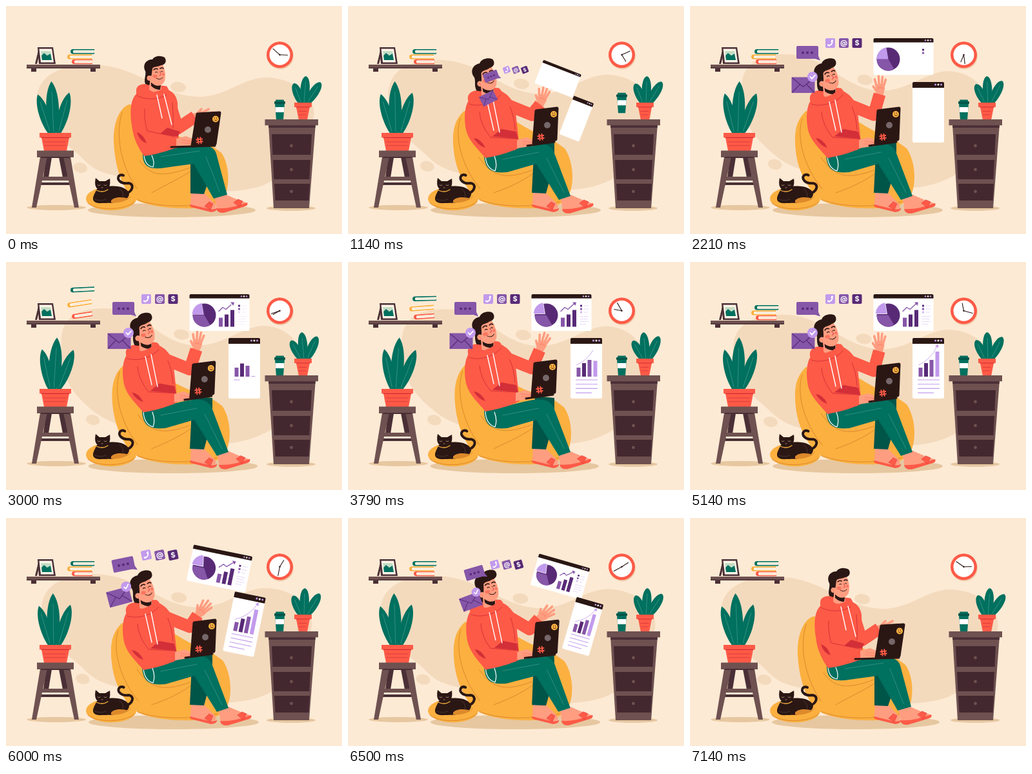
Write an HTML page that moves like this. It is 521x354 px and loops after 7210 ms.

```html
<!DOCTYPE html>
<html lang="en">
<head>
<meta charset="utf-8">
<title>Working from home</title>
<style>
  html, body { margin: 0; width: 100%; height: 100%; overflow: hidden; background: #fdead4; }
  svg { display: block; width: 100vw; height: 100vh; }
  text { font-family: Inter, Arial, sans-serif; font-weight: 700; text-anchor: middle; }
</style>
</head>
<body>
<svg id="stage" viewBox="0 0 521 354"></svg>
<script>
const LOOP = 7210;
const C = {
  blob: '#f4dabd', shadow: '#e6c7a0', coral: '#fd5a47', red: '#d22f38', bag: '#fbb040', crease: '#dd8a2c',
  teal: '#00705f', deep: '#005549', mint: '#52a392', ink: '#2a1714', wood: '#6e5150', dark: '#4a2f36',
  drawer: '#43282f', skin: '#ff9d80', blush: '#f9735e', lilac: '#c29aec', purple: '#8656a8', violet: '#582a76', white: '#fff'
};

// Timing helpers
const mix = (a, b, k) => a + (b - a) * k;
const span = (t, a, b) => Math.min(1, Math.max(0, (t - a) / (b - a)));
const smooth = (t, a, b) => { const u = span(t, a, b); return u * u * (3 - 2 * u); };
const hop = (t, peak, half) => Math.max(0, 1 - ((t - peak) / half) ** 2);
const wave = u => (1 - Math.cos(2 * Math.PI * u)) / 2;
const track = (t, keys) => {
  let i = 1;
  while (i < keys.length - 1 && t > keys[i][0]) i++;
  const [a, ...from] = keys[i - 1], [b, ...to] = keys[i], k = smooth(t, a, b);
  return from.map((v, j) => mix(v, to[j], k));
};
const morph = (a, b, k) => {
  const goal = b.match(/-?[\d.]+/g);
  let i = 0;
  return a.replace(/-?[\d.]+/g, v => mix(+v, +goal[i++], k).toFixed(2));
};

// Drawing helpers
const fill = (d, color, more = '') => `<path d="${d}" fill="${color}" ${more}/>`;
const line = (d, color, w = 1, more = '') =>
  `<path d="${d}" fill="none" stroke="${color}" stroke-width="${w}" stroke-linecap="round" stroke-linejoin="round" ${more}/>`;
const rect = (x, y, w, h, color, r = 0) => `<rect x="${x}" y="${y}" width="${w}" height="${h}" rx="${r}" fill="${color}"/>`;
const oval = (x, y, rx, ry, color, more = '') => `<ellipse cx="${x}" cy="${y}" rx="${rx}" ry="${ry}" fill="${color}" ${more}/>`;
const dot = (x, y, r, color) => oval(x, y, r, r, color);
const group = (transform, ...parts) => `<g transform="${transform}">${parts.join('')}</g>`;
const drawn = (d, color, w, k) => k > 0 ? line(d, color, w, `pathLength="1" stroke-dasharray="${k} 2"`) : '';

function blob(k) {
  return fill(morph(
    'M48,142 C50,112 78,92 128,91 C205,89 236,141 302,141 C346,138 366,112 402,111 C450,111 486,145 476,176 C466,218 436,262 400,278 C350,296 290,286 240,272 C190,262 150,272 118,236 C96,212 48,194 48,142 Z',
    'M86,128 C84,92 104,72 152,72 C216,72 236,129 298,130 C340,128 366,100 400,99 C446,101 464,138 458,170 C452,212 430,256 396,268 C350,290 290,284 240,272 C196,258 160,254 130,227 C106,206 86,186 86,128 Z', k), C.blob)
    + oval(268 + 3 * k, 126 - 14 * k, 12, 8, C.blob, `transform="rotate(8 268 120)"`)
    + oval(116 + 18 * k, 252 - 10 * k, 11, 8, C.blob, `transform="rotate(12 120 248)"`);
}

function book(x, y, w, color, lift, tilt) {
  return group(`translate(${x} ${y - lift}) rotate(${tilt} ${w / 2} 4)`,
    fill(`M${w},0 H4 Q0,0 0,3.7 Q0,7.4 4,7.4 H${w} V5.6 H5 Q2.8,3.7 5,1.8 H${w} Z`, color),
    fill(`M${w - 1},1.7 H5 Q2.8,3.7 5,5.7 H${w - 1} Z`, '#fff6e8'),
    line(`M8,3.7 H${w - 3}`, '#e5cdb4', .6));
}

function shelf(t) {
  const up = hop(t, 3170, 860);
  return rect(39, 96, 8, 6, C.dark) + rect(131, 96, 8, 6, C.dark) + rect(32, 91, 114, 6, C.wood) + rect(32, 95, 114, 2, '#573d3f')
    + fill('M51,65 L45,90 H48 L54,66 Z', C.dark) + fill('M49,64 H73 L77,90 H51 Z', C.dark)
    + fill('M51.5,66.5 H71 L74,87.5 H54 Z', '#fff6e8') + fill('M54,70 H69 L71,84 H56 Z', '#c5ddc5')
    + fill('M55,77 L59,73 L64,77 L69,74 L71,84 H56 Z', C.teal)
    + book(102, 82.8, 32, C.coral, 4 * up, -9 * up)
    + book(95, 75.2, 38, C.bag, 15 * up, -9 * up)
    + book(100, 67, 37, C.teal, 29 * up, -3 * up);
}

function clock(t) {
  const u = t / LOOP;
  const hand = (angle, len) => line(`M0,0 V${-len}`, C.ink, 1.1, `transform="rotate(${angle})"`);
  return group('translate(424.5 75.8)', dot(1, 2, 20.5, '#efcfae'), dot(0, 0, 20.5, C.coral), dot(0, 0, 16, C.white),
    hand(312 + 720 * u, 14), hand(92 + 360 * u, 12), dot(0, 0, 1.2, C.ink));
}

// A blade is widest in its middle; a blunt value near 1 gives it a round tip.
function leaf(x, y, len, w, angle, blunt = .8) {
  return group(`translate(${x} ${y}) rotate(${angle})`,
    fill(`M-3,0 C${-w},${-len * .3} ${-w},${-len * blunt} 0,${-len} C${w},${-len * blunt} ${w},${-len * .3} 3,0 Z`, C.teal),
    line(`M0,-4 V${-len * .8}`, C.mint, .6));
}

function pot(x, y, w, h) {
  const rim = h * .26;
  return fill(`M${x + 3},${y + rim} H${x + w - 3} L${x + w - 7},${y + h} H${x + 7} Z`, C.coral)
    + rect(x, y, w, rim, C.coral) + line(`M${x + 3},${y + rim} H${x + w - 3}`, C.red, 1.2)
    + line(`M${x + 7},${y + h * .5} H${x + w - 8} M${x + 8},${y + h * .7} H${x + w - 9}`, C.red, .7);
}

function stool(sway) {
  const bend = 6.5 * sway;
  return oval(78, 313, 46, 4, C.shadow)
    + leaf(69, 198, 64, 10, -18 + bend) + leaf(81, 198, 66, 10.5, 15 + bend) + leaf(74, 199, 82, 12.5, -2.5 + bend)
    + pot(52, 197, 49, 28)
    + fill('M62,235 H71 L66,266 H58 Z M82,235 H91 L96,266 H88 Z', C.dark)
    + rect(52, 274, 52, 4, C.dark) + rect(50, 265, 55, 6, C.wood)
    + fill('M53,234 H64 L47,313 H40 Z M89,234 H100 L113,313 H106 Z', C.wood)
    + rect(48, 224.5, 57, 10.5, C.wood) + rect(54, 234, 45, 2, C.dark);
}

function dresser(t, sway) {
  const bend = -9 * sway, lift = 12 * hop(t, 1000, 450);
  const drawer = (x, y, w, h, cy) => fill(`M${x},${y} h${w} l-1.5,${h} h${3 - w} Z`, C.drawer) + dot(442.5, cy, 2.4, C.wood);
  return oval(442, 314, 38, 4, C.shadow)
    + leaf(458, 152, 34, 8.5, -20 + bend, .95) + leaf(466, 152, 40, 9, 33 + bend, .95) + leaf(462, 153, 44, 9, 4 + bend, .95)
    + pot(447, 150, 27, 27)
    + group(`translate(0 ${-lift})`, fill('M417,151 H432 L430,177 H419 Z', C.teal), fill('M417.6,157 H431.5 L430.8,165 H418.2 Z', C.white),
      rect(416, 148, 17, 4, C.deep, 1), rect(418, 145.5, 13, 3, C.teal, 1))
    + fill('M407,184 H480 L470,314 H415 Z', C.wood) + fill('M407,184 H480 L479.6,189 H407.4 Z', C.dark) + rect(401.5, 176, 82.5, 9.3, C.wood)
    + drawer(412, 199, 62, 32, 217) + drawer(414, 239, 58, 30, 254) + drawer(416, 276, 55, 26, 288);
}

function cat(sway) {
  return oval(163, 299, 39, 18.5, C.bag) + line('M127,306 C140,318 184,318 200,304', C.crease, 1)
    + line('M136,297 C150,308 182,308 193,296', C.crease, 1)
    + group(`rotate(${5 * sway} 188 290)`, line('M184,292 C198,288 199,276 190,275 C178,277 171,269 175,264 Q178,261 182,263', C.ink, 4))
    + fill('M141,284 C158,277 188,277 191,292 C190,303 172,306 150,306 C136,307 132,302 137,292 Z', C.ink)
    + fill('M163,302 C168,296 180,296 190,299 C184,304 172,306 163,305 Z', C.crease)
    + fill('M139,267 L145,272 H154 L161,268 C162,276 162,285 150,286 C138,286 137,277 139,267 Z', C.ink)
    + line('M140,286 Q150,291 158,285', C.bag, 1.3)
    + line('M142,278 q2,2 4,0 M152,278 q2,2 4,0 M148,282 q1,1 2,0', '#d9b199', .7)
    + line('M138,300 Q146,304 155,300 M176,284 Q184,289 181,297', '#594038', .7);
}

function hand(x, y, angle) {
  return group(`translate(${x} ${y}) rotate(${angle})`,
    fill('M-5,4 L-7,-10 Q-6,-16 0,-16 Q8,-16 8,-9 L5,4 Z', C.skin),
    line('M-5,-13 L-8,-23 M-1,-14 L-2,-28 M3,-14 L4,-27 M6,-12 L9,-23', C.skin, 3.6),
    line('M-6,-6 L-10,-12', C.skin, 3.6), line('M-3,-9 Q1,-12 5,-9', C.blush, .7));
}

function head(k) {
  return group(`translate(${-15 * k} ${8 * k}) rotate(${-10 * k} 230 125) translate(230 122) scale(${1 + .08 * k}) translate(-230 -122)`,
    fill('M223,112 L222,130 Q233,138 241,130 L240,120 Z', C.skin),
    fill('M225,118 Q232,126 240,123 L239,130 Q231,130 225,124 Z', C.ink),
    fill('M220,100 C220,90 230,87 242,90 C247,97 248,109 246,116 C243,125 232,125 227,120 C221,116 220,110 220,100 Z', C.skin),
    fill('M216,121 C213,112 219,105 215,99 C212,89 219,83 227,83 C231,76 242,77 246,80 C250,85 247,92 240,92 C235,95 230,93 227,97 C226,104 226,109 224,111 C222,116 224,121 222,123 Z', C.ink),
    dot(222.5, 112, 4, C.skin), line('M221,111 q2,-1 2,3', C.blush, .8),
    oval(231, 109, 3.5, 2.4, C.blush), oval(244, 106, 2, 2, C.blush),
    line('M229,99 q3,-3 6,-1 M239,97 q3,-2 5,0', C.ink, 1.6),
    line('M231.5,103 q1.7,-1.6 3.4,0 M240,102 q1.5,-1.6 3,0', C.ink, 1),
    line('M238,102 Q243,107 238,108', C.red, .8), line('M233,112 Q239,116 243,111', C.ink, .9));
}

function man(t, lean) {
  // The seat settles back and the upper body rises a little halfway through.
  const rock = hop(t, 3700, 1100), seat = lean * (1 - .6 * rock);
  const m = (a, b, k = lean) => morph(a, b, k);
  const [wx, wy, turn] = track(t, [[0, 293, 172, 80], [550, 293, 172, 80], [1100, 298, 153, 15], [2100, 294, 137, 1], [2500, 294, 137, 1],
    [3790, 297, 141, 20], [5000, 293, 138, 0], [5400, 294, 139, 4], [6000, 297, 151, 40], [6250, 297, 152, 42], [7050, 293, 172, 80]]);
  const farArm = `M${mix(252, 243, lean)},${mix(145, 152, lean)} L${mix(266, 285, lean)},${mix(190, 169, lean)} L${wx},${wy}`;
  const sole = (d, strap) => fill(d, C.coral) + fill(strap, C.coral) + line(strap, C.red, .5);
  const lower = oval(mix(257, 260, seat), 317, mix(130, 132, seat), 11, C.shadow)
    // Bean bag
    + fill(m('M190,153 C174,160 166,185 167,212 C169,250 180,285 200,300 C225,315 300,320 330,306 C347,298 350,250 334,228 L318,216 C270,205 262,200 250,195 L195,153 Z',
      'M180,163 C163,178 161,200 164,225 C167,255 182,285 202,300 C225,315 300,320 332,306 C351,296 354,248 336,221 L316,207 C274,192 262,177 250,176 L190,165 Z', seat), C.bag)
    + line(m('M180,165 C169,200 178,248 203,284 M207,240 C222,262 240,268 285,251 M226,290 C250,276 270,268 287,256 M204,301 C240,314 290,312 326,304',
      'M174,175 C164,205 178,252 205,284 M203,235 C222,262 240,272 285,255 M226,290 C250,282 270,272 287,260 M204,301 C240,314 290,312 328,304', seat), C.crease, 1)
    // Legs and feet
    + fill('M287,288 L306,289 L325,308 Q327,316 318,317 L286,310 Z', C.skin)
    + sole('M285,308 L314,315 Q324,317 327,313 Q328,319 318,320 L286,312 Z', 'M308,311 L315,304 L321,307 L317,316 Z')
    + fill(m('M286,235 L286,291 L307,292 L322,248 L318,222 L300,216 Z', 'M288,230 L285,290 L307,291 L320,244 L320,211 L290,208 Z'), C.deep)
    + group(`translate(${6 * seat} ${seat})`, fill('M323,295 L339,292 L360,301 L372,305 L368,311 L340,318 L327,316 Z', C.skin),
      sole('M326,314 Q345,316 374,305 Q376,309 371,311 L338,321 Q327,322 326,314 Z', 'M353,305 L360,300 L367,303 L362,312 Z'))
    + fill(m('M212,229 C212,250 222,253 240,252 L291,245 L322,299 L343,293 L326,229 C322,215 305,216 290,217 L258,219 Z',
      'M211,231 C212,256 225,260 247,258 L292,245 L327,301 L345,295 L319,226 C312,210 292,212 272,217 L252,222 Z'), C.teal)
    + line(m('M214,231 Q215,248 228,250 Q231,243 226,232', 'M213,232 Q214,252 228,256 Q232,246 227,233'), C.white, 1.2)
    + line(m('M240,234 L300,225 M310,234 L331,288', 'M240,238 L296,227 M308,236 L335,290'), C.mint, .6);
  const upper = hand(wx, wy, turn) + line(farArm, C.coral, 19, 'style="stroke-linecap:butt"')
    // Hoodie
    + fill(m('M205,134 C194,141 191,160 195,185 C197,205 206,222 214,233 C230,231 250,226 268,218 L266,150 C264,138 258,132 248,129 Z',
      'M190,143 C181,152 179,172 183,192 C188,212 204,224 213,236 C230,233 250,228 266,220 L259,156 C253,142 244,134 234,131 Z'), C.coral)
    + fill(m('M236,201 L250,189 L270,195 L265,206 Z', 'M222,204 L238,191 L261,195 L264,207 Z'), C.red)
    + line(m('M204,160 L210,203 L266,212', 'M193,168 L208,210 L260,215'), C.coral, 18, 'style="stroke-linecap:butt"')
    + fill(m('M203,196 Q213,199 218,213 Q207,210 203,196 Z', 'M195,205 Q206,206 213,220 Q202,217 195,205 Z'), C.red)
    + line(m('M215,160 Q214,178 219,194 L262,203', 'M204,165 Q205,184 221,204 L260,206'), C.red, .9)
    + line(m('M258,150 Q260,172 259,190', 'M251,156 Q258,172 259,192'), C.red, .9)
    + fill(m('M202,131 C202,121 214,120 223,122 L246,124 C255,128 254,135 247,139 C234,147 211,145 202,138 Z',
      'M186,146 C184,135 194,130 204,131 L228,127 C238,127 240,133 236,138 C226,152 200,158 188,152 Z'), C.coral)
    + line(m('M203,139 C214,145 234,147 249,138', 'M188,152 C200,157 224,153 237,138'), C.red, .9)
    + head(lean)
    + line(m('M207,131 C218,139 238,138 248,127', 'M192,144 C206,147 224,142 233,130'), C.coral, 5)
    + line(m('M234,138 L242,174 M245,137 L257,184', 'M216,149 L226,193 M225,146 L235,196'), C.white, 1.4);
  const laptop = fill(m('M264,206 L279,202 L291,207 L290,216 L264,218 Z', 'M262,208 L277,204 L289,209 L288,217 L262,221 Z'), C.skin)
    + line(m('M273,208 L288,211 M272,212 L287,214', 'M271,210 L286,212 M271,214 L285,215'), C.blush, .7)
    + line(m('M256,219 L324,217', 'M278,217 L320,211'), C.ink, 3)
    + line(m('M297,168 L331,166 L324,214 L289,217 Z', 'M292,163 L324,159 L322,207 L288,213 Z'), C.ink, 5, `style="fill:${C.ink}"`)
    + group(`translate(${mix(325, 319, lean)} ${mix(175.5, 168, lean)})`, dot(0, 0, 5, C.bag), line('M-2,1 Q0,4 2.5,1 M-1.5,-2 v.8 M1.5,-2 v.8', C.ink, .9))
    + dot(mix(313, 309, lean), mix(192, 185, lean), 5, '#76676a')
    + group(`translate(${mix(300, 299, lean)} ${mix(209, 203.5, lean)}) rotate(-8)`, line('M-2,-4.5 V4.5 M2,-4.5 V4.5 M-4.5,-2 H4.5 M-4.5,2 H4.5', C.coral, 2));
  return lower + group(`translate(0 ${-4 * rock})`, upper) + group(`translate(${-2 * rock} ${-5 * rock})`, laptop);
}

function chartWindow(t) {
  const pie = smooth(t, 1800, 2150), text = smooth(t, 2700, 3300);
  const bar = (x, h, color, start) => { const v = h * smooth(t, start, start + 450); return rect(x, 22 - v, 6, v, color); };
  return rect(-46.5, -28.5, 93, 57, C.white, 2) + fill('M-46.5,-22 V-26.5 Q-46.5,-28.5 -44.5,-28.5 H44.5 Q46.5,-28.5 46.5,-26.5 V-22 Z', C.ink)
    + dot(34, -25.2, 1.2, C.lilac) + dot(38, -25.2, 1.2, C.white) + dot(42, -25.2, 1.2, C.lilac)
    + group(`translate(-23.5 4) scale(${pie})`, dot(0, 0, 18, C.violet), fill('M0,0 H-18 A18,18 0 0 0 9,15.6 Z', C.purple),
      group(`translate(${-2 * text} ${-2 * text})`, fill('M0,0 L-18,0 A18,18 0 0 1 -3,-17.8 Z', C.lilac, `stroke="${C.white}" stroke-width="${.8 * text}"`)))
    + bar(-1, 14, C.purple, 2250) + bar(8, 19, C.violet, 2400) + bar(17, 26, C.violet, 2550)
    + drawn('M-1,-2 L5,-8 L10,-5 L20,-14', C.purple, 1.3, smooth(t, 2600, 3100))
    + (t > 3000 ? fill('M17,-16 L23,-16 L21.5,-10.5 Z', C.purple) : '')
    + `<g opacity="${pie}">${rect(29, -12, 3, 3, C.violet)}${rect(29, -7, 3, 3, C.purple)}</g>`
    + `<g opacity="${.7 * text}">${rect(29, -2, 3, 3, C.lilac)}${line('M35,-10.5 h7 M35,-5.5 h7 M35,-.5 h6 M29,6 h13 M29,10 h11 M29,14 h13 M29,18 h9', C.lilac, .6, 'stroke-dasharray="2 1.2"')}</g>`;
}

function reportWindow(t) {
  const bar = (x, h, color, start, time = 500) => { const v = h * smooth(t, start, start + time); return rect(x, 13 - v, 6, v, color); };
  return rect(-24.5, -47, 49, 94, C.white, 3) + fill('M-24.5,-38 V-45 Q-24.5,-47 -22.5,-47 H22.5 Q24.5,-47 24.5,-45 V-38 Z', C.ink)
    + dot(11, -43, 1.5, C.lilac) + dot(15.5, -43, 1.5, C.white) + dot(20, -43, 1.5, C.lilac)
    + bar(-15, 14, C.purple, 2400) + bar(-6.5, 21, C.violet, 2550) + bar(2, 26, C.purple, 2700) + bar(11, 39, C.lilac, 2850, 1600)
    + drawn('M-15,-5 Q4,-13 14,-35', C.lilac, .8, smooth(t, 3000, 4100))
    + (t > 4000 ? fill('M10.5,-34 L15,-37.5 L16,-32 Z', C.lilac) : '')
    + [0, 1, 2, 3].map(i => drawn(`M-16,${18 + i * 6.7} H${i === 3 ? 8 : 17}`, C.lilac, 1.1, smooth(t, 2900 + 180 * i, 3200 + 180 * i))).join('');
}

function floating(t) {
  const enter = 1 - (1 - span(t, 760, 1640)) ** 2, leave = span(t, 6250, 6990) ** 2;
  const k = enter * (1 - leave);
  if (k < .01) return '';
  const spin = 66 * (1 - enter) + 12 * smooth(t, 5200, 6100) + 35 * leave;
  const item = (x, y, side, art, ox = 306, oy = 187) =>
    group(`translate(${mix(ox, x, k)} ${mix(oy, y, k)}) rotate(${side * spin}) scale(${k})`, art);
  const tile = (color, art) => rect(-7.5, -7.5, 15, 15, color, 2) + art;
  const glyph = s => `<text y="3.8" font-size="11" fill="#fff">${s}</text>`;
  const badge = smooth(t, 1750, 2050);
  return item(331, 78.5, 1, chartWindow(t), 314, 186) + item(369.5, 165, 1, reportWindow(t), 322, 196)
    + item(217.5, 57.5, -1, tile(C.lilac, line('M3.2,-4 Q4,3 -3,4', C.white, 1.6) + line('M3,-4 l-.8,1.6 M-3.4,3.2 l2,.6', C.white, 2.4)))
    + item(238.5, 57.5, -1, tile(C.purple, glyph('@')))
    + item(259, 57.5, -1, tile(C.violet, glyph('$')))
    + item(182, 72.5, -1, fill('M-15,-10.5 H15 Q17,-10.5 17,-8.5 V5 L20,12 L12,9.5 H-15 Q-17,9.5 -17,7.5 V-8.5 Q-17,-10.5 -15,-10.5 Z', C.purple)
      + dot(-7, 0, 2, C.violet) + dot(0, 0, 2, C.violet) + dot(7, 0, 2, C.violet))
    + item(175.5, 122.5, -1.3, rect(-18, -12, 36, 24.5, C.purple, 1) + line('M-17,-11 L0,3 L17,-11 M-17,11.5 L-5,-1 M17,11.5 L5,-1', C.violet, 1.1)
      + group(`translate(14.5 -12.5) scale(${badge})`, dot(0, 0, 8, C.lilac), line('M-3.5,0 L-1,2.8 L4,-2.6', C.white, 1.8)));
}

const stage = document.getElementById('stage');
function draw(now) {
  const t = now % LOOP, u = t / LOOP, sway = wave(u);
  const lean = smooth(t, 550, 1080) * (1 - smooth(t, 6300, 7050));
  stage.innerHTML = blob(wave(u ** .844)) + shelf(t) + clock(t) + stool(sway) + dresser(t, sway)
    + man(t, lean) + cat(sway) + floating(t);
}
const start = performance.now();
function tick() {
  draw(performance.now() - start);
  requestAnimationFrame(tick);
}
tick();
</script>
</body>
</html>
```
